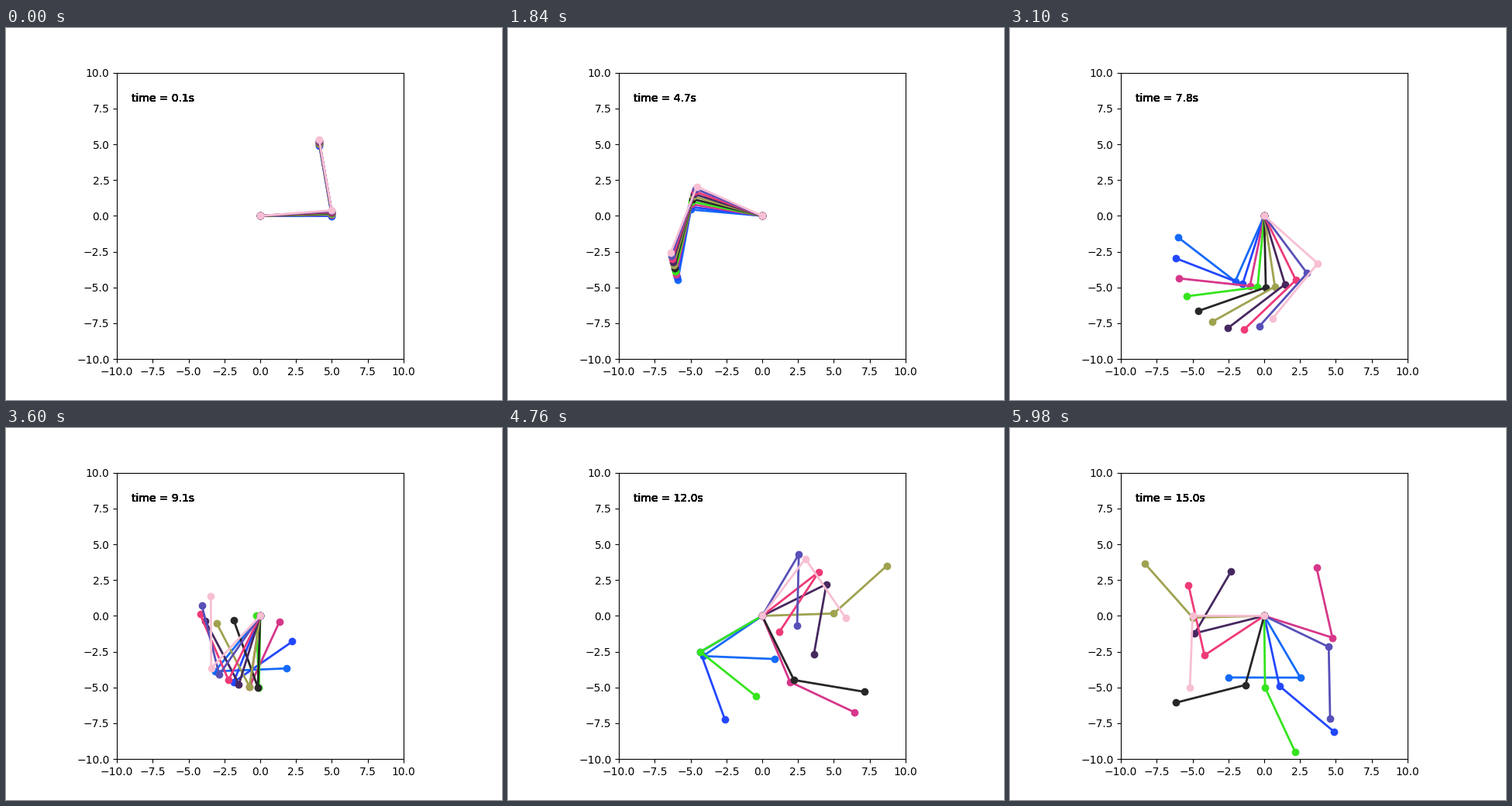
Recreate the animation shown at these times as a matplotlib script. Size 640 by 480 pixels, loop 6 s.

```python
import numpy as np
import matplotlib.pyplot as plt
from matplotlib.animation import FuncAnimation

FRAMES, INTERVAL = 300, 20
DT, SUBSTEPS = 0.05, 10
ARM, G = 5.0, 9.8
COLORS = ["#156af8", "#2347ff", "#d6378a", "#35e41e", "#282628",
          "#9fa24f", "#46285f", "#ee3a78", "#5850b8", "#f8bfd3"]


def derivative(y):
    """Double pendulums with equal arms and masses, angles from straight down."""
    a, b, w, v = y
    s, c = np.sin(b - a), np.cos(b - a)
    ga, gb = G * np.sin(a), G * np.sin(b)
    pull_a, pull_b = ARM * w * w * s, ARM * v * v * s
    den = ARM * (2 - c * c)
    dw = (pull_a * c + gb * c + pull_b - 2 * ga) / den
    dv = (2 * (ga * c - pull_a - gb) - pull_b * c) / den
    return np.stack([w, v, dw, dv])


def rk4(y, h):
    k1 = derivative(y)
    k2 = derivative(y + h / 2 * k1)
    k3 = derivative(y + h / 2 * k2)
    k4 = derivative(y + h * k3)
    return y + h / 6 * (k1 + 2 * k2 + 2 * k3 + k4)


def swing():
    """Arm angles for every frame, shaped (frame, arm, pendulum)."""
    n = len(COLORS)
    upper = np.radians(90 + 0.5 * np.arange(n))
    lower = np.radians(np.full(n, -170.0))
    y = np.stack([upper, lower, np.zeros(n), np.zeros(n)])
    poses = []
    for _ in range(FRAMES):
        for _ in range(SUBSTEPS):
            y = rk4(y, DT / SUBSTEPS)
        poses.append(y[:2])
    return np.array(poses)


poses = swing()

fig = plt.figure(figsize=(6.4, 4.8), dpi=100)
ax = fig.add_subplot(aspect="equal", xlim=(-10, 10), ylim=(-10, 10))
lines = [ax.plot([], [], "o-", lw=2, color=c)[0] for c in COLORS]
# One label per pendulum; the overlap gives the text its weight
labels = [ax.text(0.05, 0.9, "", transform=ax.transAxes) for _ in COLORS]


def update(frame):
    tenths = (frame + 2) // 2  # elapsed time, halves rounded up
    for line, label, theta in zip(lines, labels, poses[frame].T):
        line.set_data(np.r_[0, np.cumsum(ARM * np.sin(theta))],
                      np.r_[0, np.cumsum(-ARM * np.cos(theta))])
        label.set_text(f"time = {tenths / 10:.1f}s")
    return lines + labels


anim = FuncAnimation(fig, update, frames=FRAMES, interval=INTERVAL,
                     init_func=lambda: update(0), repeat=True, repeat_delay=0)
plt.show()
```
